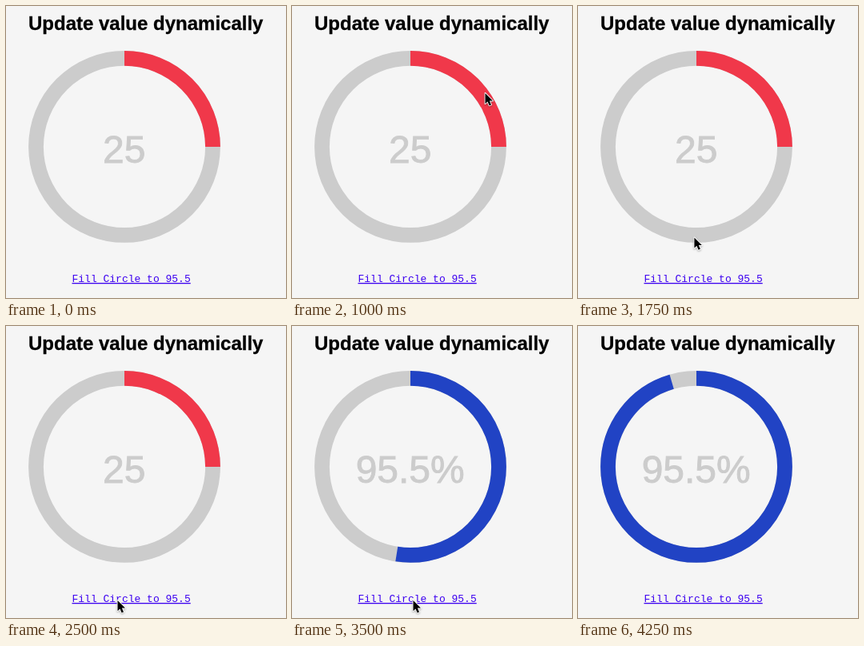
An HTML page for the animation above (5000 ms loop, 350 px wide and 365 px high).

```html
<!DOCTYPE html>
<html lang="en">
<head>
<meta charset="utf-8">
<title>Update value dynamically</title>
<style>
  html, body { margin: 0; width: 100%; height: 100%; overflow: hidden; background: #f5f5f5; }
  svg { display: block; width: 350px; height: 365px; }
  text { font-family: "Liberation Sans", Arial, sans-serif; }
  .title { font-size: 24px; font-weight: bold; stroke: #000; stroke-width: .3; }
  .value { font-size: 48px; fill: #ccc; stroke: #ccc; stroke-width: .9; text-anchor: middle; }
  .link { font: 13px "Liberation Mono", "Courier New", monospace; fill: #3c00f0; text-decoration: underline; }
  circle { fill: none; stroke-width: 18.8; }
  #cursor { filter: drop-shadow(0 1px 1px rgba(0, 0, 0, .3)); }
</style>
</head>
<body>
<svg viewBox="0 0 350 365">
  <text class="title" x="28" y="30">Update value dynamically</text>
  <circle cx="148" cy="175.9" r="110.5" stroke="#ccc"/>
  <circle id="arc" cx="148" cy="175.9" r="110.5" pathLength="100" transform="rotate(-90 148 175.9)"/>
  <text id="value" class="value" x="147.7" y="195.7"></text>
  <text class="link" x="82.5" y="345">Fill Circle to 95.5</text>
  <path id="cursor" d="M1.5 0V13.2L4.5 10.4L6.6 15.4L9 14.4L6.9 9.6H11Z"
        stroke="#fff" stroke-width="1.8" stroke-linejoin="round" paint-order="stroke"/>
</svg>
<script>
const LOOP = 5000, STEP = 250, CLICK = 3500;
const get = id => document.getElementById(id);
const arc = get("arc"), value = get("value"), cursor = get("cursor");

const linear = p => p;
const easeIn = p => p ** 3;
const easeOut = p => 1 - (1 - p) ** 3;

// The pointer enters at ENTRY, then glides to each point in turn.
const ENTRY = { x: 328, y: 81 };
const glides = [
  { from: 500, to: 1000, x: 240, y: 109, ease: easeIn },
  { from: 1000, to: 1500, x: 152, y: 216, ease: linear },
  { from: 1500, to: 2500, x: 138, y: 343, ease: easeOut },
  { from: 3000, to: 3250, x: 150, y: 343, ease: linear },
  { from: 3750, to: 4000, x: 165, y: 312, ease: linear }
];

function pointer(t) {
  let { x, y } = ENTRY;
  for (const g of glides) {
    const p = g.ease(Math.min(1, Math.max(0, (t - g.from) / (g.to - g.from))));
    x += (g.x - x) * p;
    y += (g.y - y) * p;
  }
  return `translate(${x} ${y})`;
}

function draw(now) {
  // The picture advances in quarter-second steps.
  const t = Math.floor(now % LOOP / STEP) * STEP;
  const clicked = t >= CLICK;
  const percent = clicked ? Math.min(95.5, 52.5 + (t - CLICK) * 0.107) : 25;
  arc.setAttribute("stroke", clicked ? "#2143c4" : "#f0384a");
  arc.setAttribute("stroke-dasharray", `${percent} 100`);
  value.textContent = clicked ? "95.5%" : "25";
  cursor.setAttribute("visibility", t >= 500 && t < 4250 ? "visible" : "hidden");
  cursor.setAttribute("transform", pointer(t));
}

let start;
function tick(now) {
  start ??= now;
  draw(now - start);
  requestAnimationFrame(tick);
}
draw(0);
requestAnimationFrame(tick);
</script>
</body>
</html>
```
